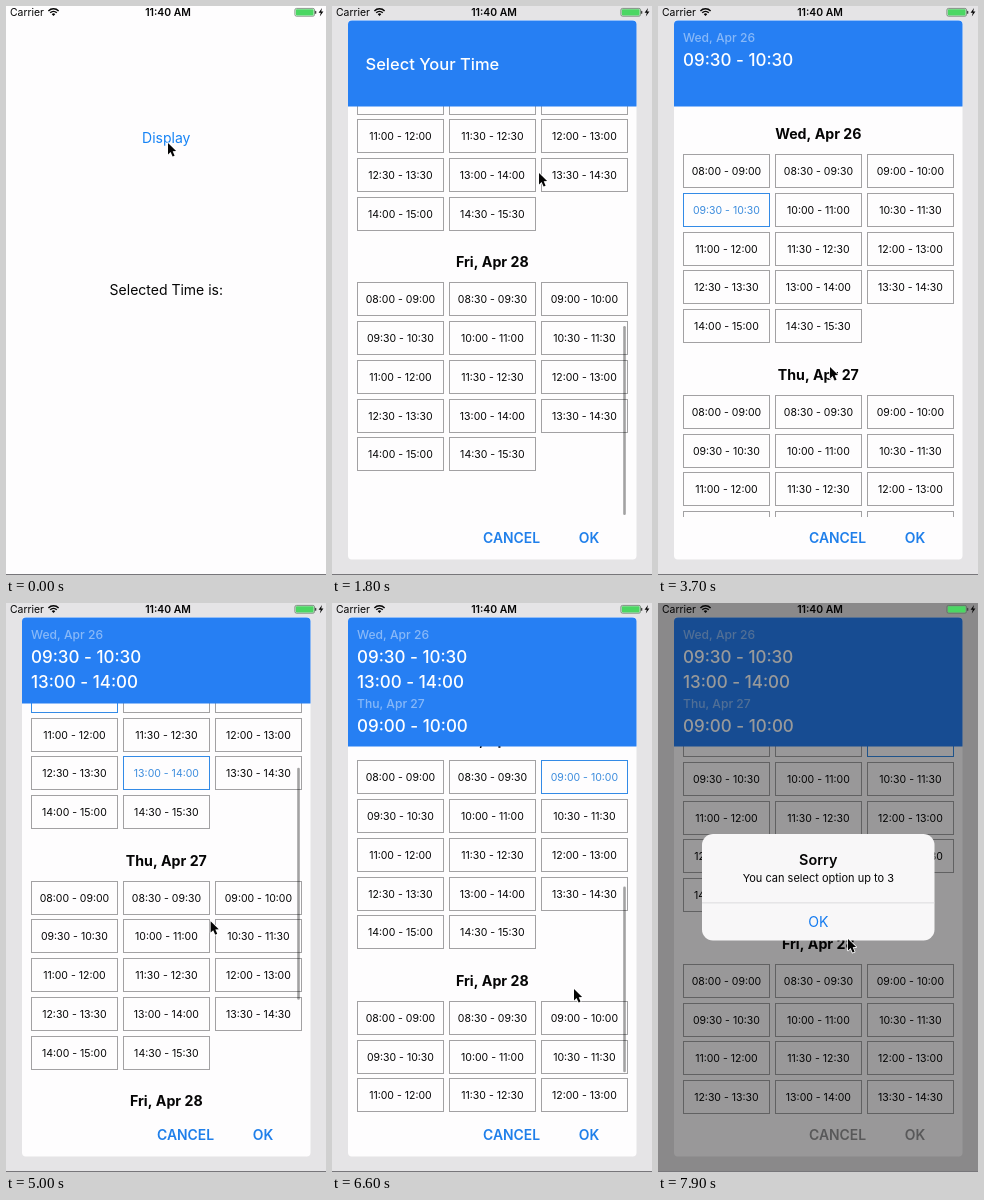
An HTML page with a canvas for the animation above (8000 ms loop, 320 by 569 pixels).

```html
<!DOCTYPE html>
<html lang="en">
<head>
<meta charset="utf-8">
<title>Time picker</title>
<style>
html, body { margin: 0; width: 100%; height: 100%; overflow: hidden; background: #fefdfe; }
canvas { display: block; width: 320px; height: 569px; }
</style>
</head>
<body>
<canvas id="stage"></canvas>
<script>
const W = 320, H = 569, LOOP = 8000, STEP = 100;
const BLUE = '#267ff3', PAPER = '#fefdfe', INK = '#050505';
const LIST_BOTTOM = 511, CONTENT = 721, SECTION = 240.6, ROW = 38.75;
const OPEN_AT = 800, ALERT_AT = 7220;
const DAYS = ['Wed, Apr 26', 'Thu, Apr 27', 'Fri, Apr 28'];
const PICKS = [
  { at: 3300, day: 0, slot: 3 },
  { at: 4200, day: 0, slot: 10 },
  { at: 5350, day: 1, slot: 2 }
];
const CURSOR = [
  [950, 162, 137], [1250, 205, 405], [1800, 207, 167], [1900, 207, 167],
  [2230, 160, 180], [2700, 157, 376], [2800, 157, 376], [3200, 70, 205],
  [3350, 70, 205], [3700, 172, 361], [4150, 160, 281], [4500, 160, 286],
  [4750, 200, 420], [5050, 205, 310], [5300, 239, 285], [5530, 239, 306],
  [5800, 239, 296], [6050, 241, 205], [6600, 242, 386], [6850, 236, 349],
  [7150, 175, 380], [7300, 175, 380], [7900, 190, 336]
];
const SCROLL = [
  [1250, 0], [1800, 353], [2120, 310], [2230, 310], [2700, -26], [2980, 0],
  [4750, 0], [5050, 120], [5530, 120], [6600, 274.5], [6880, 311.6]
];
const SCROLLING = [[1250, 2980], [4750, 5050], [5530, 6880]];

const canvas = document.getElementById('stage');
const ctx = canvas.getContext('2d');
const ratio = window.devicePixelRatio || 1;
canvas.width = Math.round(W * ratio);
canvas.height = Math.round(H * ratio);

const clamp = (v, lo = 0, hi = 1) => Math.min(hi, Math.max(lo, v));
const smooth = x => x * x * (3 - 2 * x);

// Values of a keyed track [time, ...values] at time t.
function track(keys, t) {
  const next = keys.findIndex(k => k[0] > t);
  if (next === 0) return keys[0].slice(1);
  if (next < 0) return keys[keys.length - 1].slice(1);
  const a = keys[next - 1], b = keys[next];
  const p = smooth((t - a[0]) / (b[0] - a[0]));
  return a.slice(1).map((v, i) => v + (b[i + 1] - v) * p);
}

// y is the middle of the capital letters.
function text(str, x, y, size, weight = 400, color = INK, align = 'center') {
  ctx.font = `${weight} ${size}px Inter, sans-serif`;
  ctx.textAlign = align;
  ctx.fillStyle = color;
  ctx.fillText(str, x, y + size * 0.363);
}

function rect(x, y, w, h, color) {
  ctx.fillStyle = color;
  ctx.fillRect(x, y, w, h);
}

function round(x, y, w, h, r, color) {
  ctx.beginPath();
  ctx.roundRect(x, y, w, h, r);
  ctx.fillStyle = color;
  ctx.fill();
}

function poly(points, color) {
  ctx.beginPath();
  points.forEach(([x, y]) => ctx.lineTo(x, y));
  ctx.closePath();
  ctx.fillStyle = color;
  ctx.fill();
}

function clock(halfHours) {
  const hour = String(Math.floor(halfHours / 2)).padStart(2, '0');
  return `${hour}:${halfHours % 2 ? '30' : '00'}`;
}
const slotLabel = i => `${clock(16 + i)} - ${clock(18 + i)}`;

function statusBar() {
  text('Carrier', 4, 6.3, 10.4, 400, INK, 'left');
  text('11:40 AM', 162, 6.3, 10.4, 600);
  ctx.strokeStyle = INK;
  ctx.lineWidth = 1.5;
  for (const r of [7.2, 4.6]) {
    ctx.beginPath();
    ctx.arc(47.5, 10, r, -Math.PI * 0.75, -Math.PI * 0.25);
    ctx.stroke();
  }
  ctx.beginPath();
  ctx.moveTo(47.5, 10);
  ctx.arc(47.5, 10, 2.5, -Math.PI * 0.75, -Math.PI * 0.25);
  ctx.fillStyle = INK;
  ctx.fill();

  ctx.beginPath();
  ctx.roundRect(288.9, 2.4, 19.6, 7.8, 1.6);
  ctx.strokeStyle = '#55705a';
  ctx.lineWidth = 0.7;
  ctx.stroke();
  round(289.8, 3.2, 17.8, 6.2, 0.8, '#4bd763');
  round(309, 4.8, 1.3, 3, 0.6, '#444');
  poly([[316, 2], [312.6, 6.8], [314.8, 6.8], [313.8, 10.6], [317.4, 5.5], [315.2, 5.5]], INK);
}

function home(t) {
  rect(0, 0, W, H, PAPER);
  ctx.globalAlpha = t >= 600 ? 0.2 : 1;
  text('Display', 160.3, 131.8, 14, 400, '#1583f5');
  ctx.globalAlpha = 1;
  text('Selected Time is:', 160.3, 284.2, 14);
}

function headerLines(picks) {
  const lines = [];
  let y = 10.2, day = -1;
  for (const pick of picks) {
    if (pick.day !== day) {
      y += day < 0 ? 21.8 : 21.5;
      lines.push({ str: DAYS[pick.day], y, date: true });
      y += 21.7;
    } else {
      y += 25.5;
    }
    day = pick.day;
    lines.push({ str: slotLabel(pick.slot), y });
  }
  return { lines, bottom: Math.max(100, Math.round(y + 21)) };
}

function slots(top, picks) {
  DAYS.forEach((name, day) => {
    const y = top + day * SECTION;
    text(name, 160.3, y + 28, 14.2, 700);
    for (let i = 0; i < 14; i++) {
      const x = 25 + (i % 3) * 92;
      const cy = y + 65.2 + Math.floor(i / 3) * ROW;
      const on = picks.some(p => p.day === day && p.slot === i);
      ctx.strokeStyle = on ? '#338ae6' : '#a2a1a3';
      ctx.lineWidth = 1;
      ctx.strokeRect(x + 0.5, Math.round(cy - 17) + 0.5, 86, 33);
      text(slotLabel(i), x + 43.4, cy + 0.2, 10.5, 400, on ? '#3c8cdd' : INK);
    }
  });
}

function scrollBar(t, scroll, head) {
  const last = SCROLLING.filter(([from]) => t >= from).pop();
  const alpha = last ? clamp(1 - (t - last[1] - 150) / 250) : 0;
  if (!alpha) return;
  const view = LIST_BOTTOM - head, rail = view - 4, max = CONTENT - view;
  const full = rail * view / CONTENT;
  const over = Math.max(0, -scroll, scroll - max);
  const length = full - over;
  const y = head + 2 + clamp(scroll / max) * (rail - length);
  round(291.2, y, 2.6, length, 1.3, `rgba(0,0,0,${0.36 * alpha})`);
}

function picker(t) {
  const picks = PICKS.filter(p => t >= p.at);
  const { lines, bottom } = headerLines(picks);
  const [scroll] = track(SCROLL, t);

  rect(0, 0, W, H, '#e5e4e6');
  round(16, 14, 288.5, 539.5, 4, PAPER);

  ctx.save();
  ctx.beginPath();
  ctx.rect(16, bottom, 288, LIST_BOTTOM - bottom);
  ctx.clip();
  slots(bottom - scroll, picks);
  scrollBar(t, scroll, bottom);
  ctx.restore();

  round(16, 14.5, 288.5, bottom - 14, [4, 4, 0, 0], BLUE);
  if (!lines.length) text('Select Your Time', 33.5, 58, 16.5, 500, '#fff', 'left');
  for (const { str, y, date } of lines) {
    if (date) text(str, 25, y, 12.1, 500, 'rgba(255,255,255,.45)', 'left');
    else text(str, 25, y, 17, 500, '#fff', 'left');
  }

  const action = t >= ALERT_AT ? '#929294' : '#1f7fea';
  text('CANCEL', 179.6, 532.3, 13.9, 600, action);
  text('OK', 257, 532.3, 13.9, 600, action);
}

function alertBox(t) {
  const p = clamp((t - ALERT_AT) / 350);
  const ease = 1 - (1 - p) ** 3;
  const scale = 1.2 - 0.2 * ease;
  ctx.save();
  ctx.globalAlpha = ease;
  ctx.translate(160.3, 284);
  ctx.scale(scale, scale);
  ctx.translate(-160.3, -284);
  round(44, 231, 232.5, 106.5, 11, '#f8f7f8');
  text('Sorry', 160.3, 256.9, 14.4, 600);
  text('You can select option up to 3', 160.3, 275, 11);
  rect(44, 299.5, 232.5, 0.8, '#d5d4d7');
  text('OK', 160.3, 319, 14.1, 400, '#147bf0');
  ctx.restore();
}

function pointer(t) {
  const [x, y] = track(CURSOR, t);
  ctx.save();
  ctx.translate(x, y);
  const arrow = [[0, 0], [0, 11.4], [2.6, 9], [4.6, 13.6], [6.6, 12.7], [4.7, 8.3], [8.1, 8.1]];
  ctx.lineJoin = 'round';
  poly(arrow, INK);
  ctx.strokeStyle = '#fff';
  ctx.lineWidth = 1.6;
  ctx.stroke();
  poly(arrow, INK);
  ctx.restore();
}

function draw(t) {
  ctx.setTransform(ratio, 0, 0, ratio, 0, 0);
  if (t < OPEN_AT) home(t);
  else picker(t);
  if (t >= ALERT_AT) {
    rect(0, 0, W, H, `rgba(0,0,0,${0.4 * clamp((t - ALERT_AT) / 350)})`);
  }
  statusBar();
  if (t >= ALERT_AT) alertBox(t);
  rect(0, 568, W, 1, '#77767a');
  pointer(t);
}

const start = performance.now();
function tick() {
  const t = (performance.now() - start) % LOOP;
  draw(Math.floor(t / STEP) * STEP);
  requestAnimationFrame(tick);
}
tick();
</script>
</body>
</html>
```
